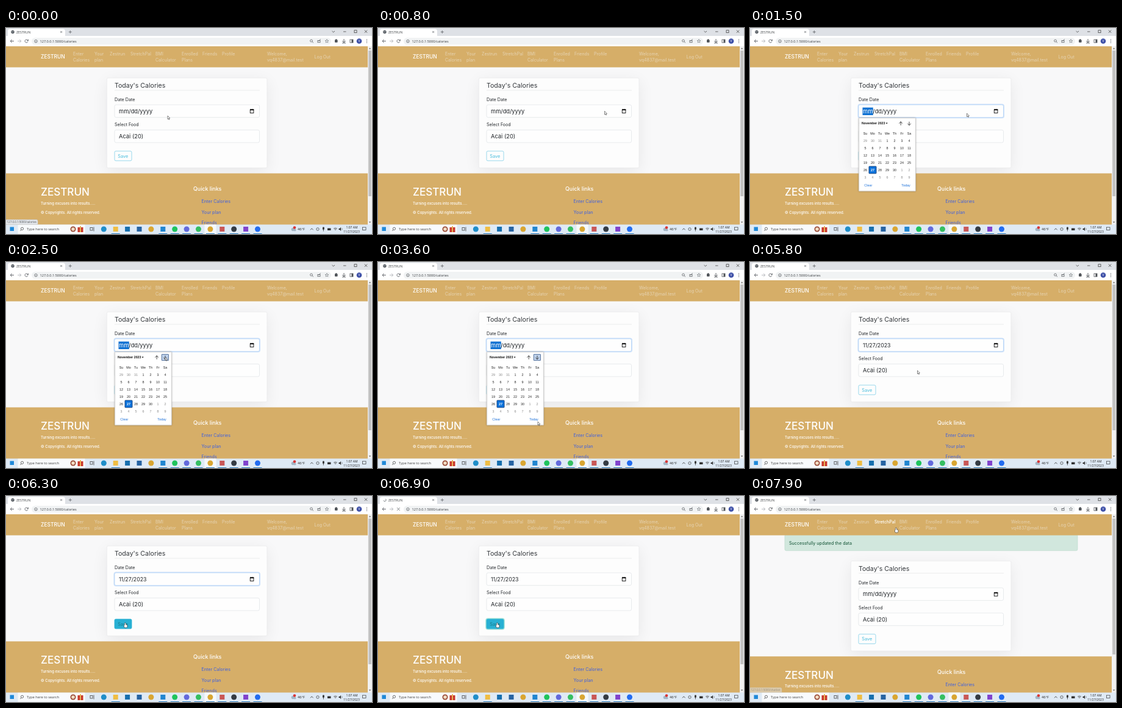
An HTML page with a canvas that plays this animation: 600x338 px, repeating every 8 s.

```html
<!DOCTYPE html>
<html lang="en">
<head>
<meta charset="utf-8">
<title>Calories</title>
<style>
html, body { margin: 0; width: 100%; height: 100%; overflow: hidden; background: #fff; }
canvas { display: block; width: 600px; height: 338px; }
</style>
</head>
<body>
<canvas id="stage"></canvas>
<script>
const canvas = document.getElementById('stage');
const c = canvas.getContext('2d');
const ratio = window.devicePixelRatio || 1;
canvas.width = 600 * ratio;
canvas.height = 338 * ratio;

const LOOP = 8000;
const PAGE = 'Inter, sans-serif', SYSTEM = '"Open Sans", sans-serif', POPUP = '"Liberation Sans", sans-serif';
const TAN = '#d6ae68', PALE = '#e6d4b4', BLUE = '#1a6fd8', INK = '#33373b', GREY = '#5f6368';

// [time, x, y] of the pointer tip
const path = [
  [0, 265, 144], [200, 265, 144], [600, 340, 138], [1000, 403, 135], [1400, 403, 135],
  [1500, 355.5, 140], [1700, 345, 143], [1800, 345, 143], [2300, 261, 156], [3300, 261, 156],
  [3600, 262, 262], [4200, 206, 238], [4600, 201.5, 231], [5000, 201.5, 231],
  [5400, 268, 174], [5500, 268, 174], [5800, 274.5, 178], [6300, 195.5, 208],
  [7300, 195.5, 208], [7900, 239.5, 52], [8000, 239.5, 52]
];

function pointerAt(t) {
  const i = Math.max(1, path.findIndex(p => p[0] > t));
  const [t0, x0, y0] = path[i - 1], [t1, x1, y1] = path[i];
  const k = (t - t0) / (t1 - t0);
  return [x0 + (x1 - x0) * k, y0 + (y1 - y0) * k];
}

function rect(x, y, w, h, color) {
  c.fillStyle = color;
  c.fillRect(x, y, w, h);
}

function box(x, y, w, h, r, fill, stroke, width = 0.6) {
  c.beginPath();
  c.roundRect(x, y, w, h, r);
  if (fill) { c.fillStyle = fill; c.fill(); }
  if (stroke) { c.strokeStyle = stroke; c.lineWidth = width; c.stroke(); }
}

function dot(x, y, r, color) {
  c.beginPath();
  c.arc(x, y, r, 0, Math.PI * 2);
  c.fillStyle = color;
  c.fill();
}

function ring(x, y, r, color, width = 0.8, from = 0, to = Math.PI * 2) {
  c.beginPath();
  c.arc(x, y, r, from, to);
  c.strokeStyle = color;
  c.lineWidth = width;
  c.stroke();
}

function line(points, color = GREY, width = 0.8) {
  c.beginPath();
  points.forEach(([x, y]) => c.lineTo(x, y));
  c.strokeStyle = color;
  c.lineWidth = width;
  c.stroke();
}

function poly(points, color) {
  c.beginPath();
  points.forEach(([x, y]) => c.lineTo(x, y));
  c.closePath();
  c.fillStyle = color;
  c.fill();
}

function text(s, x, y, size, color, { font = PAGE, weight = 400, align = 'left' } = {}) {
  c.font = `${weight} ${size}px ${font}`;
  c.textAlign = align;
  c.fillStyle = color;
  c.fillText(s, x, y);
}

function cross(x, y, r, color = GREY, width = 0.8) {
  line([[x - r, y - r], [x + r, y + r]], color, width);
  line([[x - r, y + r], [x + r, y - r]], color, width);
}

function arrow(x, y, dx, dy, color, width = 0.9) {
  line([[x - dx * 3, y - dy * 3], [x + dx * 3, y + dy * 3]], color, width);
  line([[x + dy * 2.7, y + dx * 2.7], [x + dx * 3, y + dy * 3], [x - dy * 2.7, y - dx * 2.7]], color, width);
}

function star(x, y, r) {
  const points = Array.from({ length: 11 }, (_, i) => {
    const a = i * Math.PI / 5 - Math.PI / 2, d = i % 2 ? r * 0.45 : r;
    return [x + Math.cos(a) * d, y + Math.sin(a) * d];
  });
  line(points, GREY, 0.6);
}

function drawBrowser(t, loading) {
  rect(0, 0, 600, 13, '#dee1e6');
  box(3, 1.5, 94, 16, [4, 4, 0, 0], '#fff');
  rect(0, 13, 600, 17, '#fff');
  if (loading) {
    const a = t / 160;
    ring(11, 6.5, 2.2, '#555b61', 0.8, a, a + 3.6);
  } else {
    dot(11, 6.5, 2.7, '#555b61');
    line([[9, 5.5], [11, 7], [12.5, 5.2]], '#dfe3e7', 0.6);
  }
  text('ZESTRUN', 17, 8.7, 5.4, '#3c4043', { font: SYSTEM });
  cross(90.5, 6.5, 1.5);
  line([[102.8, 6.5], [107.8, 6.5]]);
  line([[105.3, 4], [105.3, 9]]);

  line([[534.5, 5], [536.7, 7], [539, 5]], '#444');
  line([[553, 6], [557.5, 6]], '#444');
  c.strokeRect(571, 3.7, 4, 4);
  cross(590, 5.7, 2.2, '#444');

  arrow(10, 21.5, -1, 0, GREY);
  arrow(22, 21.5, 1, 0, '#b4b7bb');
  if (loading) cross(33.5, 21.5, 2.3);
  else {
    ring(33.5, 21.5, 2.5, GREY, 0.9, 0.4, 5.5);
    poly([[36.8, 18.3], [36.8, 21.2], [33.9, 21.2]], GREY);
  }
  box(42, 16, 491, 11.3, 5.6, '#f1f3f4');
  ring(49, 21.7, 2.3, GREY);
  line([[49, 21.2], [49, 23]], GREY, 0.7);
  text('127.0.0.1:5000/calories', 55.5, 23.8, 5.6, '#34383c', { font: SYSTEM });

  ring(500.5, 21, 1.9, GREY);
  line([[502, 22.4], [504, 24.3]]);
  c.strokeRect(511, 20.5, 4, 3.2);
  arrow(514, 20, 0.5, -0.5, GREY, 0.6);
  star(526, 21.5, 3);
  box(539, 19.2, 4.6, 4.6, 0.8, '#4d5156');
  dot(541.3, 19, 1, '#4d5156');
  arrow(554, 21, 0, 1, '#4d5156');
  line([[551, 24.8], [557, 24.8]], '#4d5156');
  c.strokeStyle = '#4d5156';
  c.strokeRect(564, 19, 5, 5);
  rect(566.5, 19, 2.5, 5, '#4d5156');
  dot(579, 21.5, 4.3, '#3f51a8');
  text('V', 579, 23.4, 5, '#fff', { font: SYSTEM, align: 'center' });
  [19, 21.5, 24].forEach(y => dot(591.5, y, 0.65, GREY));
}

function drawNav(botHover) {
  rect(0, 30, 593, 34.5, TAN);
  text('ZESTRUN', 57, 50, 8.5, '#fff', { weight: 500 });
  const links = [
    [110, 'Enter', 'Calories'], [145, 'Your', 'plan'], [170, 'Zestrun'], [204, 'StretchPal'],
    [245, 'BMI', 'Calculator'], [288, 'Enrolled', 'Plans'], [322, 'Friends'], [354, 'Profile'],
    [428, 'Welcome,', 'vq4837@mail.test']
  ];
  for (const [x, first, second] of links) {
    const lit = botHover && x === 204;
    text(first, x, 44.6, 7, lit ? '#fff' : PALE, { weight: lit ? 500 : 400 });
    if (second) text(second, x, 54.8, 7, PALE);
  }
  text('Log Out', 505.5, 50, 7, PALE);
}

function drawField(y, value, size, focus) {
  if (focus) box(177.3, y - 0.7, 238.9, 22.1, 3, null, '#cfe2fa', 1.6);
  box(178, y, 237.5, 20.7, 2.5, '#fefefe', focus ? '#9dc6f3' : '#d9dde1');
  text(value, 185, y + 13.7, size, '#212529');
}

function drawPage(s) {
  c.save();
  c.beginPath();
  c.rect(0, 64, 594, 259);
  c.clip();
  rect(0, 64, 594, 259, '#f8f8f9');
  if (s.saved) {
    box(57, 63, 480, 26.7, 2.5, '#d1e7dd', '#badbcc');
    text('Successfully updated the data', 64, 79.5, 7.2, '#0f5132');
    c.translate(0, 24.7);
  }
  c.shadowColor = 'rgba(0,0,0,.07)';
  c.shadowBlur = 26 * ratio;
  c.shadowOffsetY = 6 * ratio;
  box(165.3, 82, 262.7, 147.5, 2, '#fdfdfd');
  c.shadowColor = 'transparent';
  box(165.3, 82, 262.7, 147.5, 2, null, '#e6e6e7');
  text("Today's Calories", 178, 98, 10.6, INK);
  rect(178, 101.8, 238, 0.6, '#dfe0e2');
  text('Date Date', 178, 120, 7.2, '#212529');
  const size = s.picked ? 8.8 : 9.3;
  drawField(126, s.picked ? '11/27/2023' : s.open ? '' : 'mm/dd/yyyy', size, s.focus);
  if (s.open) {
    c.font = `400 ${size}px ${PAGE}`;
    const w = c.measureText('mm').width;
    rect(184.5, 130.5, w + 1, 12.5, '#1273d3');
    text('mm', 185, 139.7, size, '#fff');
    text('/dd/yyyy', 185 + w, 139.7, size, '#212529');
  }
  c.strokeStyle = '#111';
  c.lineWidth = 0.9;
  c.strokeRect(400.3, 134, 5.6, 5.5);
  rect(400, 133.3, 6.3, 1.8, '#111');
  rect(401.3, 132.7, 0.9, 1, '#111');
  rect(404, 132.7, 0.9, 1, '#111');
  text('Select Food', 178, 161, 7.1, '#212529');
  drawField(167.3, 'Acai (20)', 9.3);
  if (s.press) box(177.2, 201.2, 29.6, 17.4, 3, null, '#a4e3d8', 2);
  box(178, 202, 28, 15.8, 2, s.hover ? '#28b0d3' : '#fdfdfd', s.hover ? '#28b0d3' : '#7fcfe8', 0.8);
  text('Save', 183.3, 212.6, 7.3, s.hover ? '#167c8a' : '#45bcdc');

  rect(0, 238.5, 594, 130, TAN);
  text('ZESTRUN', 57, 275.3, 17.1, '#fff', { weight: 500 });
  text('Turning excuses into results.....', 57, 289.5, 6, '#fff', { weight: 500 });
  text('© Copyrights. All rights reserved.', 57, 305.2, 6.1, '#fff', { weight: 500 });
  text('Quick links', 307, 267.3, 8.9, '#fff', { weight: 500 });
  ['Enter Calories', 'Your plan', 'Friends'].forEach((label, i) =>
    text(label, 320.5, 287.4 + i * 17.1, 7.2, '#3d5fe0'));
  c.restore();

  rect(593, 30, 7, 293, '#f1f1f1');
  rect(594.2, 37, 4.8, s.saved ? 223 : 239, '#c1c1c1');
  poly([[594.8, 34.5], [596.6, 32.5], [598.4, 34.5]], '#666');
  poly([[594.8, 317.7], [596.6, 319.7], [598.4, 317.7]], '#666');
}

function drawCalendar(nextLit) {
  const opt = { font: POPUP, align: 'center' };
  c.shadowColor = 'rgba(0,0,0,.2)';
  c.shadowBlur = 3 * ratio;
  box(178.3, 147.5, 93.3, 120.3, 1, '#fff', '#bdbdbd');
  c.shadowColor = 'transparent';
  text('November 2023', 183, 158.4, 5.2, '#111', { font: POPUP, weight: 700 });
  poly([[222.5, 155.6], [225.7, 155.6], [224.1, 157.6]], '#111');
  if (nextLit) box(255.2, 151.5, 11.3, 10, 0.5, '#bdd0ea', '#3c5c8c', 0.8);
  arrow(247.2, 156.7, 0, -1, '#222', 0.8);
  arrow(261, 156.7, 0, 1, '#222', 0.8);
  ['Su', 'Mo', 'Tu', 'We', 'Th', 'Fr', 'Sa'].forEach((day, i) =>
    text(day, 189 + i * 12, 174.5, 5.4, '#222', opt));
  for (let i = 0; i < 42; i++) {
    const day = i - 2, x = 189 + i % 7 * 12, y = 186.6 + Math.floor(i / 7) * 12.1;
    const inside = day > 0 && day < 31, today = day === 27;
    if (today) box(195, y - 8, 12, 11.8, 0.8, '#0b72db', '#123f79', 0.9);
    const label = day < 1 ? day + 31 : day > 30 ? day - 30 : day;
    text(label, x, y, 5.4, today ? '#fff' : inside ? '#222' : '#888', { ...opt, weight: today ? 700 : 400 });
  }
  text('Clear', 193.8, 260, 5.5, BLUE, opt);
  text('Today', 255.5, 260, 5.5, BLUE, opt);
}

function drawTaskbar() {
  rect(0, 322.5, 600, 15.5, '#dfeaf5');
  rect(6.5, 326.5, 6.5, 6.5, '#2089d8');
  rect(19.5, 322.8, 110, 15, '#f8fafc');
  ring(26.5, 329.3, 2.1, '#333', 0.7);
  line([[25, 331], [23.3, 333]], '#333', 0.7);
  text('Type here to search', 34, 332.3, 5.8, '#444', { font: SYSTEM });
  dot(110, 330, 4.5, '#9a4935');
  dot(110, 330, 2.8, '#f0dcc4');
  rect(117.5, 327, 9, 8, '#c9392d');
  rect(121, 325, 2, 10, '#e8b55a');
  c.strokeStyle = '#444';
  c.lineWidth = 0.8;
  c.strokeRect(138, 327.5, 4, 4.5);
  line([[144, 326.5], [144, 333.5]], '#444');

  rect(325.5, 322.5, 19, 15.5, '#f5f9fc');
  const icons = [
    ['#1f8ec9'], ['#efbd43', 1], ['#176fae', 1], ['#2763a2', 1], ['#d9a632'], ['#2186d0', 1], ['#1fc45c'],
    ['#6369dc'], ['#35bf61'], ['#d9a632'], ['#c95757', 1], ['#343b43'], ['#8143cc', 1], ['#236cf0']
  ];
  icons.forEach(([color, square], i) => {
    const x = 160.3 + i * 19.4;
    if (square) rect(x - 4, 326, 8, 8, color);
    else dot(x, 330, 4.5, color);
    if (i === 1 || i > 4) rect(x - 7, 337, 14, 1, '#2e7fc2');
  });

  dot(470.5, 330.5, 2.8, '#a4b6c6');
  dot(473.5, 331.5, 2, '#a4b6c6');
  dot(473, 327.5, 2.3, '#d93636');
  text('46°F', 478, 332.3, 5.8, '#222', { font: SYSTEM });
  line([[499, 331.3], [501.3, 328.8], [503.6, 331.3]], '#333');
  ring(511, 330, 2.2, '#333', 0.7);
  box(519, 326.5, 2.8, 4.5, 1.3, '#333');
  line([[520.4, 331], [520.4, 333.5]], '#333');
  rect(527, 328.5, 5.5, 3.5, '#333');
  for (let r = 1.5; r < 5; r += 1.5) ring(540, 332.5, r, '#333', 0.6, -2.3, -0.85);
  poly([[545.5, 329], [547, 329], [549, 327], [549, 333], [547, 331], [545.5, 331]], '#333');
  ring(548.5, 330, 2.5, '#333', 0.5, -0.9, 0.9);
  text('1:07 AM', 567, 328.7, 5, '#222', { font: SYSTEM, align: 'center' });
  text('11/27/2023', 566.5, 335.8, 5, '#222', { font: SYSTEM, align: 'center' });
  c.strokeStyle = '#333';
  c.lineWidth = 0.7;
  c.strokeRect(584.5, 327, 5.5, 4.6);
}

function drawStatus(label, alpha) {
  c.globalAlpha = alpha;
  box(-1, 314.5, 53, 8, [0, 2, 0, 0], '#e4e7eb', '#c4c8cc');
  text(label, 1.5, 320.2, 4.5, '#50565c', { font: SYSTEM });
  c.globalAlpha = 1;
}

function drawPointer([x, y], hand) {
  c.save();
  c.translate(x, y);
  if (hand) {
    box(-1, 0, 1.9, 5, 0.9, '#fff', '#222', 0.6);
    box(-2, 3, 5.4, 5, 1.6, '#fff', '#222', 0.6);
    rect(-0.7, 1, 1.3, 4, '#fff');
  } else {
    const shape = [[0, 0], [0, 5.6], [1.3, 4.5], [2.2, 6.4], [3, 6], [2.2, 4.2], [3.9, 4]];
    poly(shape, '#fff');
    line([...shape, shape[0]], '#222', 0.55);
  }
  c.restore();
}

function draw(t) {
  c.setTransform(ratio, 0, 0, ratio, 0, 0);
  const open = t >= 1100 && t < 5000;
  const saved = t >= 7100;
  const hover = t >= 6200 && t < 7100;
  const press = t >= 6500 && t < 7100;
  const botHover = t >= 7800;
  drawPage({ open, saved, hover, press, picked: t >= 5000 && !saved, focus: t >= 1100 && t < 6500 });
  drawNav(botHover);
  drawBrowser(t, press);
  if (open) drawCalendar(t >= 2300 && t < 3900);
  drawTaskbar();
  if (t < 500) drawStatus('127.0.0.1:5000/calories', 1);
  if (botHover) drawStatus('127.0.0.1:5000/chatbot', t >= 7900 ? 0.5 : 0.25);
  drawPointer(pointerAt(t), t >= 6200 && (t < 7400 || botHover));
}

function tick(now) {
  draw(Math.floor(now % LOOP / 100) * 100);
  requestAnimationFrame(tick);
}
requestAnimationFrame(tick);
</script>
</body>
</html>
```
